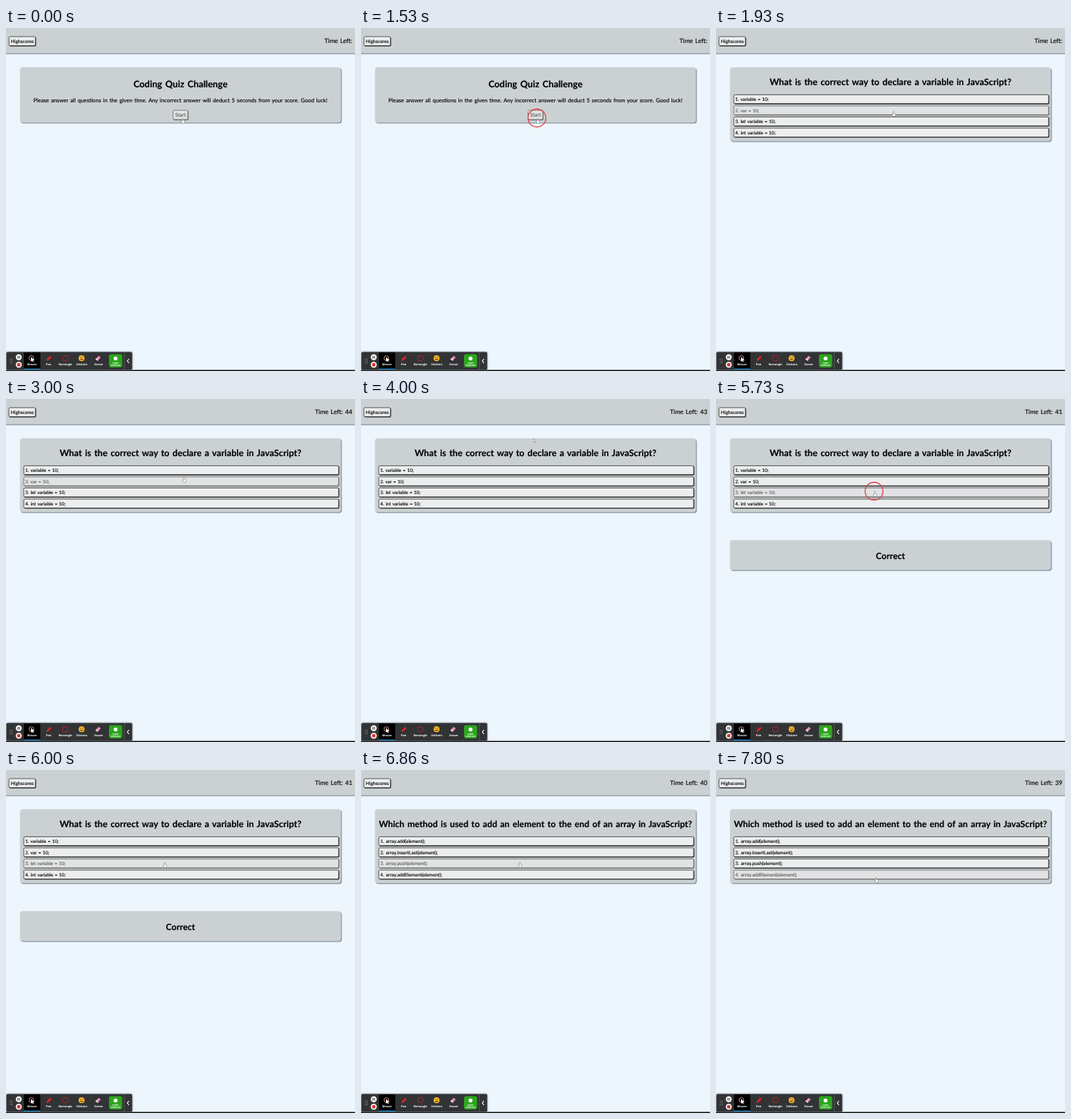
Recreate the animation shown at these times as an HTML page. Size 488x480 px, loop 8 s.

```html
<!DOCTYPE html>
<html lang="en">
<head>
<meta charset="utf-8">
<title>Coding Quiz</title>
<style>
  html, body { margin: 0; height: 100%; overflow: hidden; background: #edf5fd; }
  svg { display: block; width: 488px; height: 480px; }
  text { font-family: Lato, "Open Sans", sans-serif; word-spacing: .1em; text-rendering: geometricPrecision; }
  #scene text { stroke: #000; stroke-width: .14; }
  .bold { font-weight: 700; }
  .panel { fill: #cbd1d3; filter: drop-shadow(1px 1px .7px #708294); }
  .button { fill: #ecedee; stroke: #333; stroke-width: .8; }
  .edge { fill: #333; }
  .hover .button { fill: #e1e2e4; stroke: #666; }
  .hover .edge { fill: #777; }
  #scene .hover text { fill: #5c5c5c; stroke: #5c5c5c; }
  #tools text { fill: #fff; font: 700 3.9px "Open Sans", sans-serif; text-anchor: middle; }
  #bar { fill: #323335; filter: drop-shadow(0 0 .8px #4a5a66); }
</style>
</head>
<body>
<svg viewBox="0 0 488 480">
  <g id="scene"></g>
  <path d="M0 479.2H488" stroke="#0c0c0c" stroke-width="1.6"/>
  <g id="tools">
    <rect id="bar" x=".6" y="453.4" width="175.8" height="24.8" rx="1.5"/>
    <path d="M6 463v7M8.5 463v7" stroke="#aaa" stroke-dasharray="1 1.5"/>
    <circle cx="17.8" cy="460.8" r="4.2" fill="#f4f4f4"/>
    <path d="M16.7 459v3.6M18.9 459v3.6" stroke="#333"/>
    <circle cx="17.8" cy="471.2" r="4.2" fill="#f4f4f4"/>
    <rect x="15.6" y="469" width="4.4" height="4.4" rx="1" fill="#e0302c"/>
    <rect x="25" y="454" width="23" height="24" fill="#000"/>
    <path d="M25 477.2H48" stroke="#1c83c4" stroke-width="1.4"/>
    <circle cx="35.5" cy="462" r="3.3" fill="none" stroke="#e9a08f" stroke-width=".9"/>
    <path d="M35 460.5l5 4.3-2.2.3 1 2-1.1.5-1-2-1.7 1.3z" fill="#fff"/>
    <path d="M56.5 466l.8-2.8 4.4-4.4 2 1.9-4.4 4.4z" fill="#e3242b"/>
    <rect x="79.3" y="459" width="7.6" height="6.4" rx="1.6" fill="none" stroke="#d3222a" stroke-dasharray="2.2 .6"/>
    <circle cx="105.7" cy="462.2" r="4.1" fill="#f3b62c"/>
    <path d="M103.3 463q2.4 3.6 4.8 0z" fill="#713d13"/>
    <path d="M104.3 460v1.5M107.1 460v1.5" stroke="#713d13" stroke-width=".9"/>
    <path d="M125 463.5l4.5-4.7 3 2.2-4.4 4.8z" fill="#e58bc0"/>
    <path d="M125 463.5l1.3-1.4 3 2.4-1.2 1.3z" fill="#f5d6e8"/>
    <rect x="144" y="456.5" width="18.5" height="18.5" rx="3" fill="#2ca51d"/>
    <circle cx="153.2" cy="462.5" r="2.7" fill="#fff"/>
    <path d="M165.5 454V478" stroke="#555"/>
    <path d="M172 463l-2.4 3 2.4 3" fill="none" stroke="#fff" stroke-width="1.2"/>
    <text x="36.3" y="472">Mouse</text>
    <text x="59.7" y="472">Pen</text>
    <text x="83" y="472">Rectangle</text>
    <text x="106" y="472">Stickers</text>
    <text x="129.6" y="472">Eraser</text>
    <text x="153.3" y="469.9" style="font-size:3px">START</text>
    <text x="153.3" y="473" style="font-size:3px">WEBCAM</text>
  </g>
  <circle id="ring" r="12.5" fill="none" stroke="#e23b3f" stroke-width="1.3"/>
  <g id="cursor" stroke="#6b6b6b" stroke-width=".5" fill="#fff">
    <path id="hand" d="M-.7.6q.7-1 1.4 0V3l2 .7v2L2 7.4h-3L-2.3 4.6-.7 4.8z"/>
    <path id="arrow" d="M-1 0V5.4L.2 4.4 1.1 6.4 2 6 1.2 4.1H2.8z"/>
  </g>
</svg>
<script>
const LOOP = 8000, START = 1660, ANSWER = 5720, NEXT = 6690;
const TICKS = [2630, 3660, 4640, 5660, 6660, 7600];
const CLICKS = [1530, 5660];
// cursor tip: time, x, y
const PATH = [[0, 247, 126], [1760, 247, 126], [2060, 249, 110], [3000, 249, 109],
  [3460, 246, 82], [3660, 245, 78], [4000, 242, 55], [4460, 242, 55], [5000, 225, 122],
  [5260, 222, 129], [7460, 222, 129], [7800, 224, 150], [LOOP, 224, 150]];
const QUESTIONS = [
  { title: "What is the correct way to declare a variable in JavaScript?", size: 12.55, small: 6.4,
    options: ["variable = 10;", "var = 10;", "let variable = 10;", "int variable = 10;"] },
  { title: "Which method is used to add an element to the end of an array in JavaScript?", size: 12.3, small: 6.6,
    options: ["array.add(element);", "array.insertLast(element);", "array.push(element);", "array.addElement(element);"] }
];
const $ = id => document.getElementById(id);

const text = (s, x, y, size, anchor = "middle", cls = "") =>
  `<text x="${x}" y="${y}" font-size="${size}" text-anchor="${anchor}" class="${cls}">${s}</text>`;
const panel = (y, h) => `<rect class="panel" x="19.5" y="${y}" width="449" height="${h}" rx="4"/>`;
const button = (x, y, w, h, label, hover) =>
  `<g class="${hover ? "hover" : ""}"><rect class="edge" x="${x + .7}" y="${y + .7}" width="${w}" height="${h}" rx="2"/>
   <rect class="button" x="${x + .4}" y="${y + .4}" width="${w - .8}" height="${h - .8}" rx="1.6"/>${label}</g>`;

function cursorAt(t) {
  const i = PATH.findIndex(p => p[0] > t), a = PATH[i - 1], b = PATH[i];
  const u = (t - a[0]) / (b[0] - a[0]), k = u * u * (3 - 2 * u);
  return [a[1] + (b[1] - a[1]) * k, a[2] + (b[2] - a[2]) * k];
}

const rowY = i => 93 + i * 15.55;

function scene(t, hovered) {
  const ticks = TICKS.filter(x => x <= t).length;
  let s = `<rect class="panel" x="-4" y="-4" width="496" height="39.5"/>`
    + button(3.7, 11.7, 37.8, 13.4, text("Highscores", 22.8, 21, 6.6))
    + text("Time Left:" + (ticks ? " " + (45 - ticks) : ""), 484.3, 21, 8.75, "end");
  if (t < START) {
    return s + panel(55, 77.5) + text("Coding Quiz Challenge", 244, 82.6, 12.8, "middle", "bold")
      + text("Please answer all questions in the given time. Any incorrect answer will deduct 5 seconds from your score. Good luck!", 244, 104.3, 7.74)
      + button(233.2, 114.7, 21.4, 13.8, text("Start", 244, 124, 7.1), true);
  }
  const q = QUESTIONS[t < NEXT ? 0 : 1];
  s += panel(55, 103.5) + text(q.title, 244, 80.3, q.size, "middle", "bold");
  q.options.forEach((o, i) => {
    const y = rowY(i);
    s += button(24.5, y, 441, 13.2, text(`${i + 1}. ${o}`, 27, y + 9.2, q.small, "start"), i === hovered);
  });
  if (t >= ANSWER && t < NEXT) s += panel(197.5, 42) + text("Correct", 244, 223.5, 12.2, "middle", "bold");
  return s;
}

let shown;
function frame(now) {
  const t = now % LOOP, [x, y] = cursorAt(t);
  const hovered = [0, 1, 2, 3].findIndex(i => y >= rowY(i) && y <= rowY(i) + 14);
  const html = scene(t, hovered);
  if (html !== shown) $("scene").innerHTML = shown = html;

  const pointing = t < START || hovered >= 0;
  $("hand").style.display = pointing ? "" : "none";
  $("arrow").style.display = pointing ? "none" : "";
  $("cursor").setAttribute("transform", `translate(${x} ${y})`);

  const age = Math.min(...CLICKS.map(c => t >= c ? t - c : Infinity));
  $("ring").setAttribute("transform", `translate(${x - 1} ${y})`);
  $("ring").style.opacity = age < 130 ? 1 : Math.max(0, 1 - (age - 130) / 130);
  requestAnimationFrame(frame);
}
requestAnimationFrame(frame);
</script>
</body>
</html>
```
